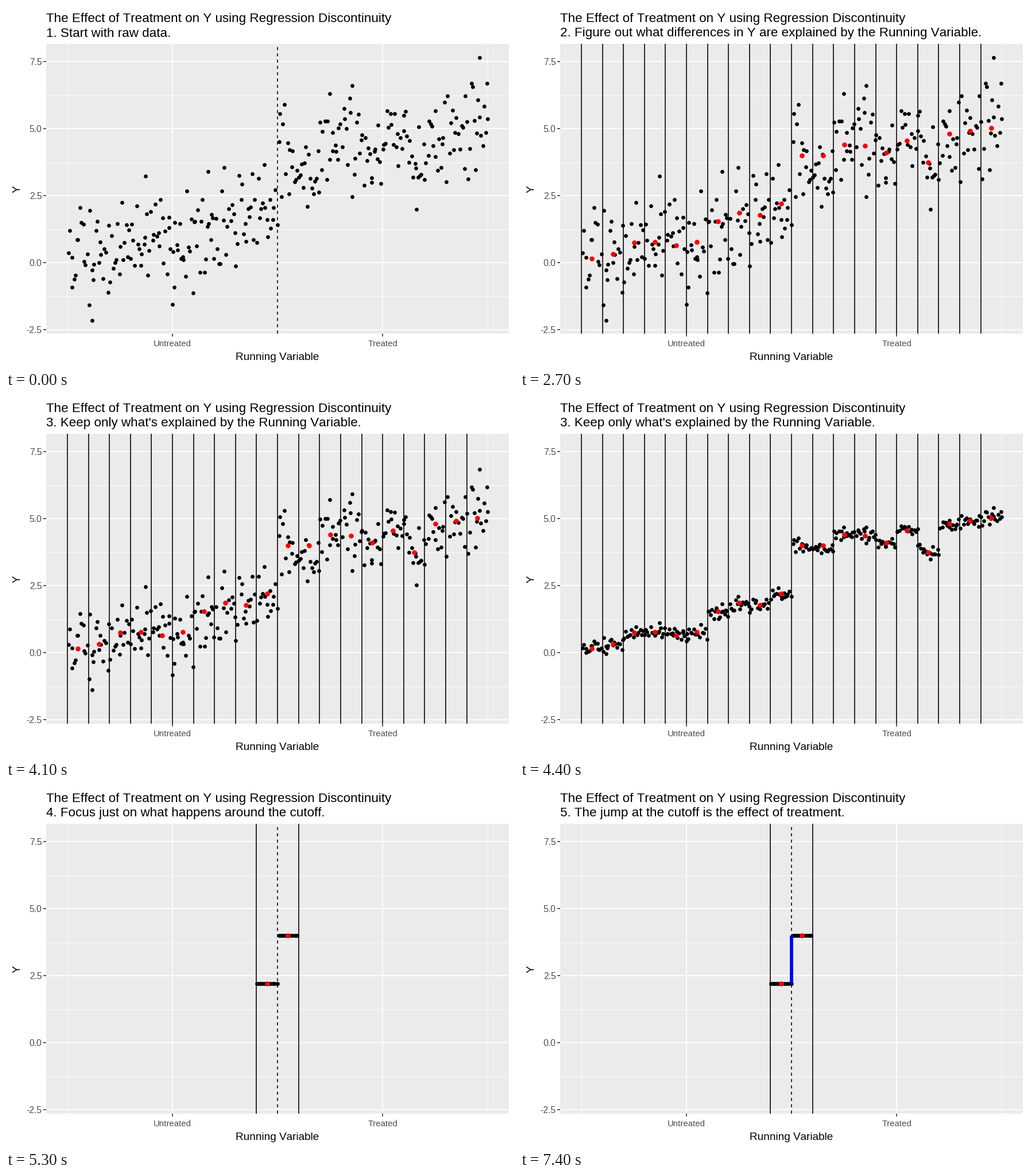
A matplotlib script that plays this animation: 885 by 632 pixels, repeating every 10000 ms.

```python
import math

import matplotlib.pyplot as plt
import numpy as np
from matplotlib.animation import FuncAnimation
from matplotlib.patches import Rectangle

W, H, DPI = 885, 632, 100
STEP_MS, LOOP_MS = 100, 10000
PX = 72 / DPI  # one pixel in points

LEFT, RIGHT, TOP, BOTTOM = 70.4, 875.8, 66, 572
N_BINS, N_POINTS = 20, 290

HEADING = "The Effect of Treatment on Y using Regression Discontinuity"
STEPS = [
    (0, "1. Start with raw data."),
    (2500, "2. Figure out what differences in Y are explained by the Running Variable."),
    (3900, "3. Keep only what's explained by the Running Variable."),
    (5300, "4. Focus just on what happens around the cutoff."),
    (6700, "5. The jump at the cutoff is the effect of treatment."),
]
BINS_AT, COLLAPSE_AT, FOCUS_AT, JUMP_AT = 2700, 3800, 5300, 7400
COLLAPSE_MS = 800

BIN_MEANS = np.array([
    0.15, 0.32, 0.75, 0.76, 0.65, 0.77, 1.54, 1.85, 1.77, 2.20,
    3.99, 3.99, 4.40, 4.36, 4.11, 4.56, 3.75, 4.80, 4.91, 5.02,
])
EXTREMES = np.array([
    (0.059, -2.16), (0.250, -1.55), (0.186, 3.23), (0.334, 3.40),
    (0.677, 6.60), (0.831, 1.98), (0.980, 7.66), (0.998, 6.69),
])


def to_x(value):
    return 107 + 732.2 * value


def to_y(value):
    return 448 - 46.8 * value


def make_points():
    """Even scatter along x, normal noise around each bin's mean."""
    rng = np.random.default_rng(4)
    x = (np.arange(N_POINTS) + rng.random(N_POINTS)) / N_POINTS
    noise = np.clip(rng.normal(0, 0.95, N_POINTS), -1.9, 1.9)
    y = BIN_MEANS[(x * N_BINS).astype(int)] + noise
    return np.append(x, EXTREMES[:, 0]), np.append(y, EXTREMES[:, 1])


x, y = make_points()
owner = (x * N_BINS).astype(int)
centers = (np.arange(N_BINS) + 0.5) / N_BINS
near = slice(N_BINS // 2 - 1, N_BINS // 2 + 1)
is_near = (owner >= near.start) & (owner < near.stop)

plt.rcParams["font.family"] = "Liberation Sans"
plt.rcParams["text.kerning_factor"] = 6
fig = plt.figure(figsize=(W / DPI, H / DPI), dpi=DPI, facecolor="white")
ax = fig.add_axes([0, 0, 1, 1])
ax.set_xlim(0, W)
ax.set_ylim(H, 0)
ax.axis("off")


def label(px, py, text, size, color="black", **kw):
    return ax.text(px, py, text, fontsize=size * PX, color=color,
                   va="baseline", **kw)


def segment(xs, ys, color, width, z=1, **kw):
    return ax.plot(xs, ys, color=color, lw=width * PX, zorder=z,
                   solid_capstyle="butt", **kw)[0]


def vertical(value, color, width, z=1, **kw):
    return segment([to_x(value)] * 2, [BOTTOM, TOP], color, width, z, **kw)


def horizontal(value, color, width):
    return segment([LEFT, RIGHT], [to_y(value)] * 2, color, width)


def dots(color, size, z):
    return ax.plot([], [], "o", color=color, ms=size * PX, mew=0, zorder=z)[0]


ax.add_patch(Rectangle((LEFT, TOP), RIGHT - LEFT, BOTTOM - TOP,
                       color="#EBEBEB", lw=0, zorder=0))
for value in np.arange(-1.25, 7, 2.5):
    horizontal(value, "white", 0.9)
for value in (0, 0.5, 1):
    vertical(value, "white", 0.9)
for value in np.arange(-2.5, 8, 2.5):
    py = to_y(value)
    horizontal(value, "white", 1.7)
    segment([LEFT - 5, LEFT], [py, py], "#333333", 1.6)
    label(62.5, py + 6, f"{value:.1f}", 15.6, "#4D4D4D", ha="right")
for value, name in ((0.25, "Untreated"), (0.75, "Treated")):
    px = to_x(value)
    vertical(value, "white", 1.7)
    segment([px, px], [BOTTOM, BOTTOM + 5], "#333333", 1.6)
    label(px, 594, name, 15, "#4D4D4D", ha="center")

label(70.4, 28, HEADING, 22.4)
subtitle = label(70.4, 53.5, "", 22.4)
label(473, 618.5, "Running Variable", 19, ha="center")
label(25, 319.5, "Y", 19, ha="center", rotation=90, rotation_mode="anchor")

dash = 5.5 / 1.6
cutoff_line = vertical(0.5, "black", 1.6, 2, ls=(0, (dash, dash)),
                       dash_capstyle="butt")
bin_lines = [vertical(i / N_BINS, "black", 1.6, 2) for i in range(N_BINS)]
black = dots("black", 6.8, 3)
red = dots("red", 8.6, 4)
jump = segment([to_x(0.5)] * 2, to_y(BIN_MEANS[near]), "blue", 5.8, 5)


def update(frame):
    t = frame * STEP_MS
    subtitle.set_text([text for start, text in STEPS if t >= start][-1])

    progress = min(max((t - COLLAPSE_AT) / COLLAPSE_MS, 0), 1)
    ease = (1 - math.cos(math.pi * progress)) / 2
    moved = y + (BIN_MEANS[owner] - y) * ease

    focused = t >= FOCUS_AT
    binned = BINS_AT <= t < FOCUS_AT
    keep = is_near if focused else slice(None)
    black.set_data(to_x(x[keep]), to_y(moved[keep]))
    shown = near if focused else slice(None)
    red.set_data(to_x(centers[shown]), to_y(BIN_MEANS[shown]))
    red.set_visible(t >= BINS_AT)

    for i, line in enumerate(bin_lines):
        line.set_visible(binned or (focused and i in (near.start, near.stop)))
    cutoff_line.set_visible(not binned)
    jump.set_visible(t >= JUMP_AT)
    return [subtitle, black, red, cutoff_line, jump, *bin_lines]


anim = FuncAnimation(fig, update, frames=LOOP_MS // STEP_MS, interval=STEP_MS,
                     repeat=True, repeat_delay=0, blit=False)
plt.show()
```
